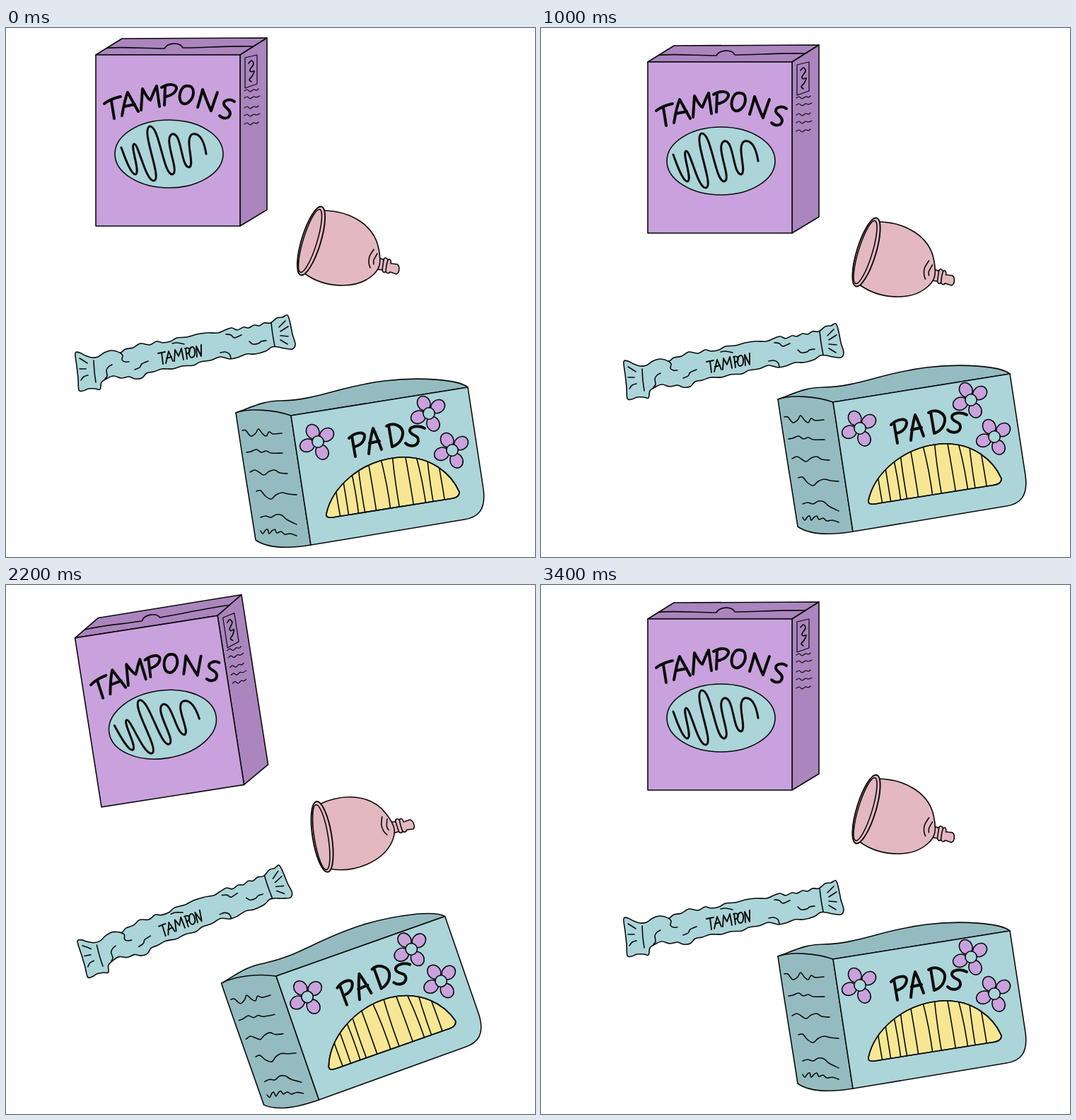
An HTML page for the animation above (3600 ms loop, 748 by 748 pixels).

```html
<!DOCTYPE html>
<html lang="en">
<head>
<meta charset="utf-8">
<title>Period products</title>
<style>
html, body { margin: 0; width: 100%; height: 100%; overflow: hidden; background: #fff; }
svg { display: block; width: 100vw; height: 100vh; }
</style>
</head>
<body>
<svg id="stage" viewBox="0 0 748 748" fill="none" stroke="#0a0a0a" stroke-width="1.6" stroke-linecap="round" stroke-linejoin="round"></svg>
<script>
const NS = 'http://www.w3.org/2000/svg';
const LILAC = '#c9a2dd', PLUM = '#ab85be', TEAL = '#abd5d9', DEEP = '#94bcc0', PINK = '#e3b8c1', YELLOW = '#f7e794';
const stage = document.getElementById('stage');

function add(parent, tag, attrs) {
  const el = document.createElementNS(NS, tag);
  for (const k in attrs) el.setAttribute(k, attrs[k]);
  return parent.appendChild(el);
}
const group = (parent, attrs) => add(parent, 'g', attrs);
const path = (parent, d, fill = 'none') => add(parent, 'path', { d, fill });
const oval = (parent, cx, cy, rx, ry, turn, fill) =>
  add(parent, 'ellipse', { cx, cy, rx, ry, fill, transform: `rotate(${turn} ${cx} ${cy})` });

// Smooth curve through points written as "x,y x,y ..."
function smooth(text, closed) {
  const p = text.trim().split(/\s+/).map(s => s.split(',').map(Number));
  const n = p.length;
  const at = i => closed ? p[(i + n) % n] : p[Math.max(0, Math.min(n - 1, i))];
  let d = 'M' + p[0];
  for (let i = 0; i < (closed ? n : n - 1); i++) {
    const [a, b, c, e] = [at(i - 1), at(i), at(i + 1), at(i + 2)];
    d += `C${b[0] + (c[0] - a[0]) / 6} ${b[1] + (c[1] - a[1]) / 6} ` +
         `${c[0] - (e[0] - b[0]) / 6} ${c[1] - (e[1] - b[1]) / 6} ${c}`;
  }
  return d + (closed ? 'Z' : '');
}
const curves = (parent, list) => list.forEach(s => path(parent, smooth(s)));

function lettering(parent, label, width, strokes) {
  const g = group(parent, { role: 'img', 'aria-label': label, 'stroke-width': width });
  strokes.forEach(d => path(g, d));
}

function drawBox(g) {
  path(g, 'M127 38L164 15L369 14L331 38Z', PLUM);
  path(g, 'M331 38L369 14V257L331 280Z', PLUM);
  path(g, 'M127 38H331V280H127Z', LILAC);
  path(g, 'M142 28.5C165 26 195 29 224 29C229 20 246 20 250 28C280 28 310 25 350 26');
  lettering(g, 'TAMPONS', 4, [
    'M139 107C145 102 153 99 162 97', 'M149 103L153 128',
    'M164 124C166 112 168 101 172 91C177 100 182 109 187 118', 'M167 111L182 108',
    'M191 116L193 86C197 93 200 100 204 102C207 96 209 89 213 82L217 111',
    'M225 83L224 109', 'M220 84C230 78 242 79 241 86C239 93 231 96 226 97',
    'M258 82C248 80 243 95 247 104C254 113 265 101 265 91C265 85 262 82 258 82Z',
    'M271 112C274 103 276 95 278 87C282 98 286 109 290 117C293 108 296 99 299 91',
    'M323 104C317 99 307 102 308 108C310 114 317 114 317 121C316 129 307 129 302 124'
  ]);
  oval(g, 230.5, 178, 76.5, 48, 0, TEAL);
  const s = group(g, { 'stroke-width': 3 });
  path(s, 'M163 169C169 186 177 207 183 207C191 205 175 167 181 164C187 162 197 216 209 216' +
    'C222 214 190 145 203 139C217 137 222 207 235 207C247 204 221 156 235 150' +
    'C249 147 247 197 259 197C268 194 251 155 264 150C276 148 281 165 283 178');
  const m = group(g, { 'stroke-width': 1.2 });
  path(m, 'M338 42L355 38V79L338 85Z');
  const t = group(g, { 'stroke-width': 1.7 });
  curves(t, ['343,50 347,46 350,51 345,59 347,62 351,61 348,68 344,73 347,76']);
  [89, 99, 113, 124, 136].forEach((y, i) =>
    curves(m, [`337,${y} 341,${y - 2} 345,${y + 1} 350,${y - 2} 354,${y - 1} ${357 + i % 2 * 2},${y - 3}`]));
}

function drawCup(g) {
  path(g, 'M527 324C531 328 533 326 534 328C535 323 539 325 540 328C543 325 545 329 544 333' +
    'L553 334C557 336 557 346 552 348L543 345C541 348 538 347 537 344C535 347 532 345 532 342L523 341Z', PINK);
  path(g, 'M449 258C488 259 521 279 527 312C531 331 529 341 518 350C494 371 449 367 422 347Z', PINK);
  oval(g, 431.5, 301, 13.5, 50.5, 17, PINK).setAttribute('stroke-width', 1.9);
  oval(g, 430, 301, 9.8, 46.5, 17, PINK);
  curves(g, ['520,313 514,323 513,332 515,339', '525,319 520,328 520,334',
    '534,328 533,335 532,342', '540,328 538,336 537,344']);
}

function drawWrapper(g) {
  path(g, smooth('98,460 104,459 112,463 121,466 130,465 139,459 148,456 156,457 162,459 169,454 180,452 ' +
    '190,446 203,448 213,443 222,445 233,443 242,438 256,437 270,433 285,431 300,431 310,427 319,424 327,427 ' +
    '336,423 343,424 351,420 358,421 365,417 374,417 383,410 391,409 398,406 402,418 405,433 409,447 405,454 ' +
    '394,453 384,451 376,451 367,457 352,461 340,461 327,466 316,468 303,465 289,470 275,472 265,477 249,478 ' +
    '236,482 221,482 209,486 199,488 192,495 182,496 174,493 163,495 152,492 142,496 135,501 133,511 126,510 ' +
    '117,510 109,513 103,512 102,496 100,478', true), TEAL);
  curves(g, ['124,470 125,486 127,501', '375,417 377,433 380,450',
    '104,467 109,470 115,474', '104,482 113,482', '106,498 110,493 116,491',
    '386,423 390,419 395,414', '388,429 399,422', '388,435 399,436', '388,441 398,447',
    '140,496 143,492 142,484 145,479 150,476', '161,459 165,463 164,469 168,472 174,472',
    '182,483 189,480 192,475 201,471', '235,446 242,445 252,447',
    '311,433 318,434 323,438 333,434', '344,443 349,447 357,446 361,443 368,442',
    '303,459 310,458 316,461 318,467']);
  lettering(g, 'TAMPON', 1.9, [
    'M215 460L225 458', 'M220 459L222 475',
    'M226 474L230 457L236 471', 'M227 467L234 465',
    'M238 471L239 455L244 464L248 453L251 469',
    'M254 453L256 468', 'M253 453C260 450 263 458 255 461',
    'M263 451C257 453 258 466 263 466C269 465 268 450 263 451Z',
    'M270 465L269 450L276 464L276 448'
  ]);
}

function flower(g, x, y) {
  for (const a of [-117, -38, 68, 161])
    add(g, 'ellipse', { cx: 16, cy: 0, rx: 10.5, ry: 9, fill: LILAC, transform: `translate(${x} ${y}) rotate(${a})` });
  oval(g, x, y, 8.2, 8.2, 0, TEAL);
}

function drawPads(g) {
  path(g, 'M325 544C350 535 364 527 390 527C440 526 470 507 535 499C585 493 640 497 653 508L403 548Z', DEEP);
  path(g, 'M325 544C345 537 380 540 403 548L431 731C400 736 370 736 353 724C344 665 333 600 325 544Z', DEEP);
  path(g, 'M403 548L653 508L675 652C679 682 667 692 648 695C580 706 505 719 431 731Z', TEAL);
  curves(g, [
    '334,569 339,569 346,577 353,573 357,567 363,574 368,577 372,571 378,574 390,573',
    '340,600 346,599 354,596 361,600 368,598 375,601 391,601',
    '345,628 352,625 359,629 365,632 372,627 380,625 387,629 398,630',
    '354,655 360,654 367,662 375,666 382,660 390,657 400,659 411,660',
    '360,692 367,690 375,692 382,688 390,689 397,695 411,702',
    '360,711 363,715 367,710 370,709 372,715 376,711 380,709 383,714 389,712 394,716 402,715 411,718'
  ]);
  const arc = 'M453 687C461 650 500 612 555 607C601 604 630 631 641 656C641 663 635 665 626 666L468 691C458 693 452 693 453 687Z';
  path(add(add(g, 'defs', {}), 'clipPath', { id: 'arc' }), arc);
  path(g, arc, YELLOW);
  const bars = group(g, { 'clip-path': 'url(#arc)' });
  [460, 470, 482, 496, 510, 528, 546, 564, 579, 595, 609].forEach((x, i) => {
    const bend = i % 3 * 2 - 1;
    path(bars, `M${x} 602Q${x + 6 + bend * 2} 645 ${x + 15 + bend} 698`);
  });
  path(g, arc);
  flower(g, 441, 585);
  flower(g, 598, 545);
  flower(g, 631, 597);
  lettering(g, 'PADS', 4, [
    'M489 577L494 606', 'M485 580C494 571 508 570 507 578C506 587 498 591 493 592',
    'M513 602C514 590 516 577 519 566C524 576 528 588 531 596', 'M514 587L528 584',
    'M541 562L546 592', 'M538 563C549 556 562 564 561 574C560 584 553 590 546 592',
    'M592 566C584 561 570 563 571 570C573 577 584 575 583 584C581 593 570 592 565 587'
  ]);
}

// slide: offset of the second pose; from/to/turn: tilted pose; nudge: offset of the third pose from the tilted one
const items = [
  { draw: drawBox, slide: [24, 10], from: [127, 280], to: [135, 314], turn: -8.9, nudge: [12, 12] },
  { draw: drawCup, slide: [28.5, 16], from: [556, 340], to: [576, 336], turn: -26.2, nudge: [-2, -6] },
  { draw: drawWrapper, slide: [19, 12], from: [98, 460], to: [101, 504], turn: -10.5, nudge: [2, -2] },
  { draw: drawPads, slide: [10, -19], from: [403, 548], to: [382, 553], turn: -10.4, nudge: [-3, -6] }
];

for (const it of items) {
  it.node = group(stage, {});
  it.draw(it.node);
  const tilt = `translate(${it.to}) rotate(${it.turn}) translate(${it.from.map(v => -v)})`;
  it.poses = ['translate(0,0)', `translate(${it.slide})`, `translate(${it.nudge}) ${tilt}`, tilt];
}

function render(ms) {
  const pose = Math.floor(ms % 3600 / 200) % 4;
  for (const it of items) it.node.setAttribute('transform', it.poses[pose]);
}
function tick(now) {
  render(now);
  requestAnimationFrame(tick);
}
render(0);
requestAnimationFrame(tick);
</script>
</body>
</html>
```
